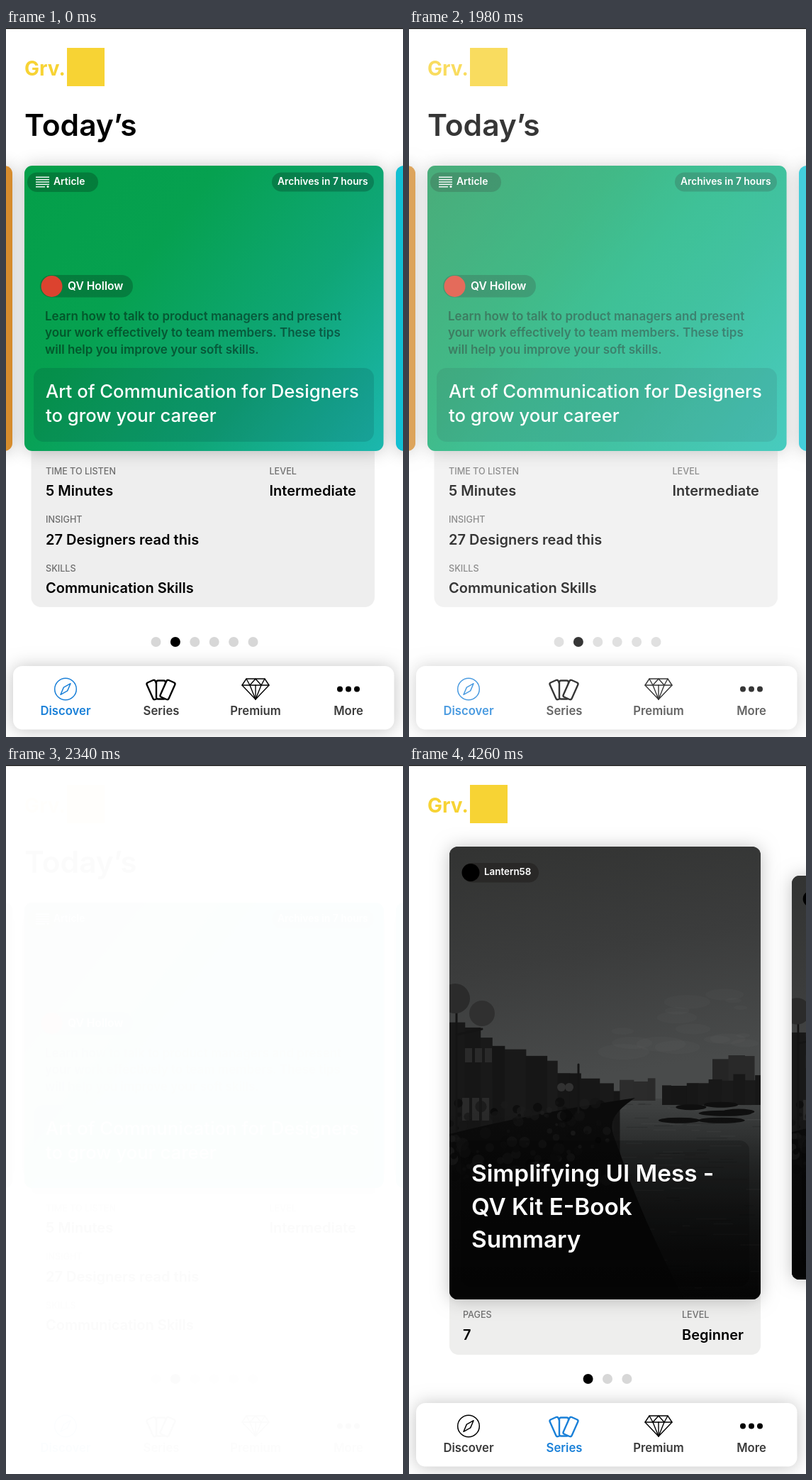
Animation of 560x999 px, one loop 4.32 s. Source, as an HTML page with a canvas:

```html
<!DOCTYPE html>
<html lang="en">
<head>
<meta charset="utf-8">
<title>Reading app</title>
<style>
html, body { margin: 0; width: 100%; height: 100%; overflow: hidden; background: #fff; }
canvas { display: block; width: 100vw; height: 100vh; }
</style>
</head>
<body>
<canvas id="stage" width="560" height="999"></canvas>
<script>
const ctx = document.getElementById('stage').getContext('2d');
const LOOP = 4320, STEP = 60, CUT = 2580;
const BLUE = '#1a80d8', INK = '#000', GREY = '#6e6e6e', YELLOW = '#f7d334';
const clamp = v => Math.max(0, Math.min(1, v));
const smooth = v => clamp(v) ** 2 * (3 - 2 * clamp(v));
const mix = (a, b, u) => a + (b - a) * u;
const grey = (v, alpha = 1) => `rgba(${v},${v},${v},${alpha})`;

let seed;
const rnd = () => (seed = (seed * 16807) % 2147483647) / 2147483647;
const between = (a, b) => mix(a, b, rnd());

function text(str, x, y, size, color, weight = 600, align = 'left') {
  ctx.font = `${weight} ${size}px Inter, sans-serif`;
  ctx.textAlign = align;
  ctx.fillStyle = color;
  ctx.fillText(str, x, y);
}
function lines(rows, x, y, leading, ...style) {
  rows.forEach((row, i) => text(row, x, y + i * leading, ...style));
}
function box(x, y, w, h, r, fill) {
  ctx.beginPath();
  ctx.roundRect(x, y, w, h, r);
  ctx.fillStyle = fill;
  ctx.fill();
}
function raised(x, y, w, h, r, fill) {
  ctx.save();
  ctx.shadowColor = grey(0, 0.24);
  ctx.shadowBlur = 24;
  ctx.shadowOffsetY = 1;
  box(x, y, w, h, r, fill);
  ctx.restore();
}
function disc(x, y, r, fill, ry = r) {
  ctx.beginPath();
  ctx.ellipse(x, y, r, ry, 0, 0, 7);
  ctx.fillStyle = fill;
  ctx.fill();
}
function line(...points) {
  ctx.beginPath();
  points.forEach(p => ctx.lineTo(...p));
  ctx.stroke();
}
function placed(x, y, angle, paint) {
  ctx.save();
  ctx.translate(x, y);
  ctx.rotate(angle);
  paint();
  ctx.restore();
}
function gradient(x0, y0, x1, y1, ...colors) {
  const g = ctx.createLinearGradient(x0, y0, x1, y1);
  colors.forEach((c, i) => g.addColorStop(i / (colors.length - 1), c));
  return g;
}

function brand() {
  text('Grv.', 26, 67, 28, YELLOW, 700);
  box(86, 28, 53, 54, 0, YELLOW);
}
function pager(count, active) {
  const gap = 27.4, left = 280 - gap * (count - 1) / 2;
  for (let i = 0; i < count; i++) disc(left + i * gap, 865, 7, i === active ? INK : '#d7d7d7');
}
function field(label, value, x, y) {
  text(label, x, y, 12.6, GREY, 500);
  text(value, x, y + 30.5, 20, INK);
}

// Icons are drawn around their own centre.
function compass() {
  ctx.lineWidth = 1.5;
  ctx.beginPath();
  ctx.arc(0, 0, 15.3, 0, 7);
  ctx.stroke();
  placed(0, 0, 0.73, () => line([0, -10.5], [3.6, 0], [0, 10.5], [-3.6, 0], [0, -10.5]));
}
function cards() {
  ctx.lineWidth = 2.4;
  for (const i of [-1, 0, 1]) {
    placed(i * 9.5 - 0.5, 1, i * 0.42, () => {
      box(-6.5, -13, 13, 26, 2.5, '#fff');
      ctx.stroke();
    });
  }
}
function diamond() {
  ctx.lineWidth = 1.4;
  line([0, -5.5], [0, 14.5]);
  for (const side of [-1, 1]) {
    line([0, -14.5], [13 * side, -14.5], [19 * side, -5.5], [0, 14.5], [8 * side, -5.5], [0, -14.5]);
    line([0, -5.5], [19 * side, -5.5]);
    line([13 * side, -14.5], [8 * side, -5.5]);
  }
}
function more() {
  for (const i of [-1, 0, 1]) disc(i * 12, 0, 4, INK);
}
function navBar(active) {
  raised(10, 899, 537.5, 89.5, 13, '#fff');
  const tabs = [['Discover', 84, compass], ['Series', 219, cards], ['Premium', 352, diamond], ['More', 483, more]];
  ctx.lineJoin = ctx.lineCap = 'round';
  tabs.forEach(([name, x, icon], i) => {
    ctx.strokeStyle = i === active ? BLUE : INK;
    placed(x, 931.5, 0, icon);
    text(name, x, 968, 16.7, i === active ? BLUE : '#3b3b3b', 600, 'center');
  });
}

function storyCard(x, fill, wash, washFill) {
  raised(x, 194, 506.5, 402, 11, fill);
  ctx.globalAlpha = wash;
  box(x, 194, 506.5, 402, 11, washFill);
  ctx.globalAlpha = 1;
}
function discover(fade) {
  const pill = grey(0, 0.22);
  const mint = '#0dcaac';
  const wash = clamp(fade * 1.5);
  brand();
  text('Today’s', 26, 152, 42.5, INK);

  box(35.5, 580, 484.5, 236, 14, '#eee');
  storyCard(-497.5, '#d88d2d', wash ** 3, '#7d7d7d');
  storyCard(550, '#12c1d4', wash ** 3, mint);
  storyCard(26, gradient(26, 194, 532, 596, '#049f49', '#06a150', '#0fa676', '#1cb7ae'),
    wash, gradient(26, 194, 532, 596, '#458271', mint, mint));

  box(30, 203.5, 100, 27.5, 14, pill);
  for (let i = 0; i < 5; i++) box(42, 209.5 + i * 3.4, i < 4 ? 19 : 13, 1.4, 0, '#fff');
  disc(59, 223.5, 1.5, '#fff');
  text('Article', 67, 220.5, 13.9, '#fff');
  box(375, 203.5, 144, 27, 14, pill);
  text('Archives in 7 hours', 383, 220.5, 13.8, '#fff');

  box(48, 348, 131, 31.5, 16, pill);
  disc(64.5, 364, 15, '#dc432f');
  text('QV Hollow', 87, 369, 15.6, '#fff');

  lines(['Learn how to talk to product managers and present',
    'your work effectively to team members. These tips',
    'will help you improve your soft skills.'], 55, 412, 23.3, 17, grey(0, 0.46));

  box(39, 479, 480, 104, 14, 'rgba(0,30,40,.13)');
  lines(['Art of Communication for Designers', 'to grow your career'], 56, 521, 34, 25.7, '#fff', 500);

  const facts = [['TIME TO LISTEN', '5 Minutes'], ['INSIGHT', '27 Designers read this'], ['SKILLS', 'Communication Skills']];
  facts.forEach(([label, value], i) => field(label, value, 56, 628.5 + i * 68.5));
  field('LEVEL', 'Intermediate', 371.5, 628.5);
  pager(6, 1);
  navBar(0);
}

function skyline(x, end, topStart, topEnd, base, shade) {
  const start = x;
  while (x < end) {
    const w = between(12, 30);
    const top = mix(topStart, topEnd, (x - start) / (end - start)) + between(-6, 6);
    ctx.fillStyle = grey(shade + between(-3, 3));
    ctx.fillRect(x, top, Math.min(w, end - x) + 0.5, base - top);
    x += w;
  }
}
// A dusk canal in flat shapes, in a 439 x 638 space.
function scenery() {
  seed = 91;
  ctx.fillStyle = gradient(0, 0, 60, 350, '#323332', '#3b3c3c', '#494b4b');
  ctx.fillRect(0, 0, 439, 638);
  for (let i = 0; i < 16; i++) {
    const r = between(10, 40);
    disc(between(230, 420), between(190, 290), r, grey(125, 0.06), r * 0.3);
  }

  ctx.fillStyle = gradient(0, 355, 0, 638, '#414343', '#292b2b', '#191a1a', '#0c0c0c');
  ctx.fillRect(200, 355, 239, 283);
  for (let i = 0; i < 90; i++) {
    ctx.fillStyle = grey(rnd() < 0.5 ? 0 : 110, 0.12);
    ctx.fillRect(between(230, 430), 360 + 270 * rnd() ** 1.6, between(8, 50), 1.5);
  }

  skyline(240, 290, 332, 332, 358, 42);
  skyline(371, 430, 295, 293, 350, 40);
  skyline(300, 439, 332, 322, 364, 24);
  for (let i = 0; i < 7; i++) disc(between(310, 430), between(362, 386), between(16, 40), grey(15), 4);

  skyline(0, 240, 250, 350, 460, 24);
  for (let i = 0; i < 3; i++) {
    ctx.fillStyle = grey(42);
    ctx.fillRect(22 + i * 14, 284, 10, 20);
    ctx.fillRect(18 + i * 14, 354, 10, 32);
  }

  ctx.beginPath();
  ctx.moveTo(0, 405);
  ctx.quadraticCurveTo(120, 375, 262, 354);
  ctx.bezierCurveTo(215, 385, 230, 400, 240, 430);
  ctx.quadraticCurveTo(270, 520, 331, 638);
  ctx.lineTo(0, 638);
  ctx.fillStyle = '#0b0b0b';
  ctx.fill();
  for (let i = 0; i < 120; i++) {
    disc(between(0, 225), between(360, 470), between(2, 9), grey(between(6, 32), 0.7));
  }

  ctx.strokeStyle = grey(20);
  ctx.lineWidth = 3;
  line([10, 235], [10, 400]);
  line([10, 265], [46, 257]);
  line([182, 307], [182, 375]);
  disc(8, 214, 21, grey(43));
  disc(46, 235, 18, grey(48));
  for (const i of [0, 1]) disc(158 + i * 11, 339, 6, grey(50));

  ctx.fillStyle = gradient(0, 370, 0, 638, grey(0, 0), grey(0, 0.6));
  ctx.fillRect(0, 370, 439, 268);
}
function photoCard(x, y, scale) {
  ctx.save();
  ctx.translate(x, y);
  ctx.scale(scale, scale);
  raised(0, 0, 439, 638, 12, '#333');
  ctx.beginPath();
  ctx.roundRect(0, 0, 439, 638, 12);
  ctx.clip();
  scenery();
  box(16, 414, 407, 206, 14, grey(0, 0.22));
  box(18, 23, 108, 27.5, 14, '#292827');
  disc(30, 36.5, 12.5, '#000');
  ctx.restore();
}
function series() {
  brand();
  box(57, 730, 439, 101, 13, '#eeeeed');
  photoCard(540, 156, 0.892);
  photoCard(57, 115, 1);
  text('Lantern58', 106, 154.5, 13.4, '#fff');
  lines(['Simplifying UI Mess -', 'QV Kit E-Book', 'Summary'], 88, 587, 46.5, 33.3, '#fff');
  field('PAGES', '7', 76, 779);
  field('LEVEL', 'Beginner', 385, 779);
  pager(3, 0);
  navBar(1);
}

function draw(now) {
  const t = Math.floor((now % LOOP) / STEP) * STEP;
  ctx.fillStyle = '#fff';
  ctx.fillRect(0, 0, 560, 999);
  if (t < CUT) {
    const fade = 0.985 * smooth((t - 1860) / 400);
    discover(fade);
    ctx.fillStyle = grey(255, fade);
    ctx.fillRect(0, 0, 560, 999);
  } else {
    series();
  }
  ctx.fillStyle = INK;
  ctx.fillRect(0, 0, 560, 1.3);
}

let start;
function tick(now) {
  start ??= now;
  draw(now - start);
  requestAnimationFrame(tick);
}
requestAnimationFrame(tick);
</script>
</body>
</html>
```
